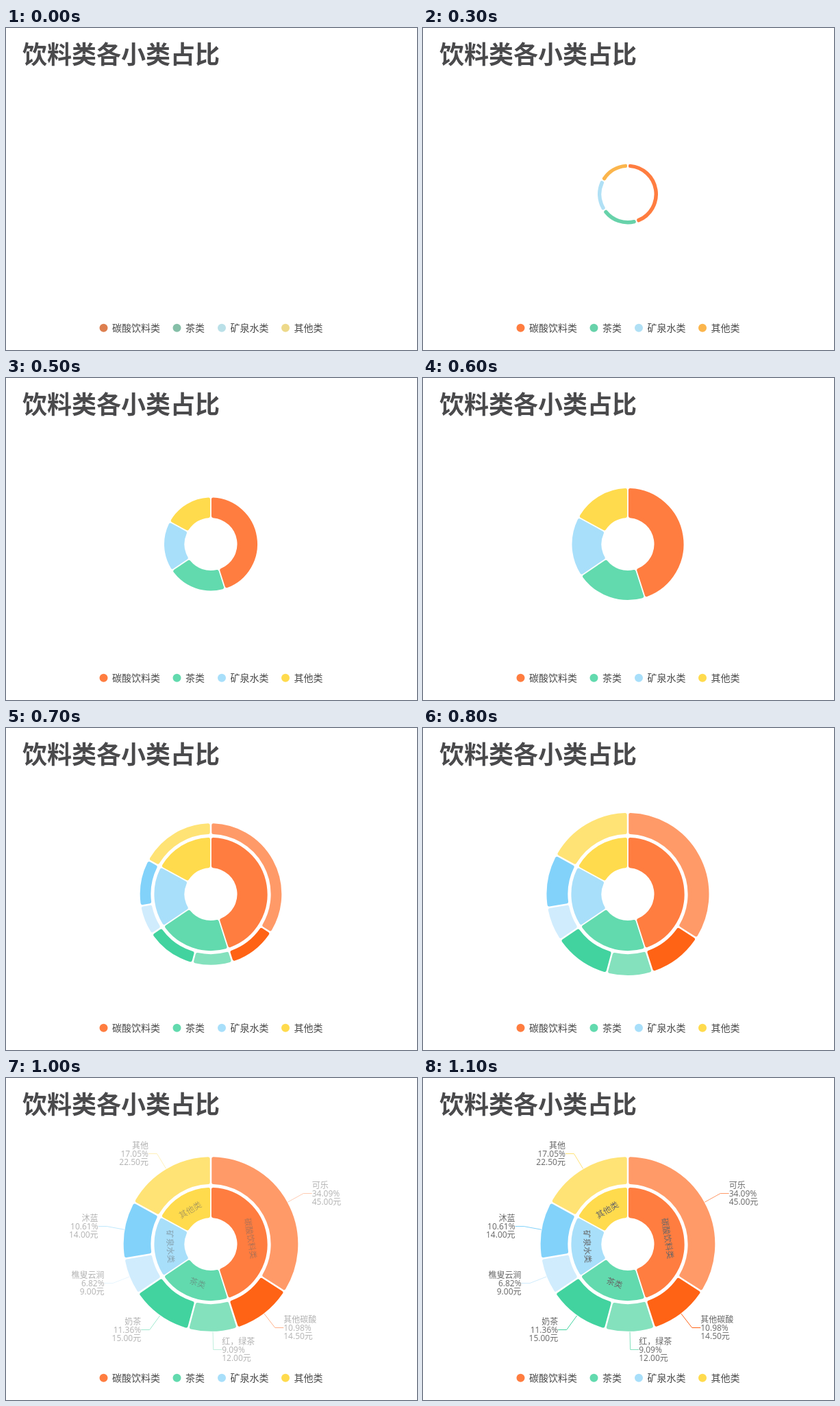
These frames come from a looping animation (600x470 px, 3 s). An HTML page:

```html
<!DOCTYPE html>
<html lang="zh-CN">
<head>
<meta charset="utf-8">
<title>饮料类各小类占比</title>
<style>
html, body { margin: 0; width: 100%; height: 100%; overflow: hidden; background: #fff; }
svg { display: block; width: 600px; height: 470px; }
text { font-family: "Open Sans", "Noto Sans CJK SC", "Noto Sans CJK", sans-serif; font-size: 12px; fill: #666; }
.title { font-size: 36px; font-weight: bold; fill: #4a4a4c; }
.legend { font-size: 14px; fill: #484848; }
.leader { fill: none; stroke-width: 1; }
path { stroke-linejoin: round; }
</style>
</head>
<body>
<svg id="stage" viewBox="0 0 600 470">
  <text class="title" x="24" y="52">饮料类各小类占比</text>
  <g id="legend"></g>
  <g id="rings"></g>
  <g id="labels"></g>
</svg>
<script>
const CX = 299, CY = 242.5, TOTAL = 132, LOOP = 3000, STEP = 100;
const groups = [
  { name: '碳酸饮料类', value: 59.5, color: '#ff7d40', legendX: 142.5 },
  { name: '茶类', value: 27, color: '#62daae', legendX: 249.5 },
  { name: '矿泉水类', value: 23, color: '#a8dffa', legendX: 315 },
  { name: '其他类', value: 22.5, color: '#ffdb4d', legendX: 408 }
];
const items = [
  { name: '可乐', value: 45, color: '#ff9a68' },
  { name: '其他碳酸', value: 14.5, color: '#ff6315' },
  { name: '红，绿茶', value: 12, color: '#84e1bd' },
  { name: '奶茶', value: 15, color: '#42d39f' },
  { name: '樵叟云涧', value: 9, color: '#d0ecfd' },
  { name: '沐蓝', value: 14, color: '#82d2fa' },
  { name: '其他', value: 22.5, color: '#ffe375' }
];
const mutedColors = ['#dd7f4f', '#85bfa8', '#bae0e8', '#edd98a'];
const earlyColors = ['#ff7d40', '#67d2aa', '#b0e0f5', '#fbb54c'];

// Outer radius of each ring, one value per step from its start; the last one holds.
const innerRing = { items: groups, inner: 38.5, gap: 1.8, start: 3, radii: [44, 55.5, 68, 81.5, 82.6] };
const outerRing = { items, inner: 87.6, gap: 2.5, start: 7, radii: [103.3, 118.5, 125.6, 127.3] };

function add(parent, tag, attrs, content = '') {
  const node = document.createElementNS('http://www.w3.org/2000/svg', tag);
  for (const key in attrs) node.setAttribute(key, attrs[key]);
  node.textContent = content;
  return document.getElementById(parent).appendChild(node);
}

// Angles run clockwise from twelve o'clock.
const point = (radius, angle) => [CX + radius * Math.sin(angle), CY - radius * Math.cos(angle)];

function sectorPath(inner, outer, from, to, inset, corner) {
  const ri = inner + corner, ro = outer - corner;
  const di = Math.asin(inset / ri), dout = Math.asin(inset / ro);
  return `M${point(ri, from + di)}L${point(ro, from + dout)}` +
    `A${ro} ${ro} 0 0 1 ${point(ro, to - dout)}L${point(ri, to - di)}` +
    `A${ri} ${ri} 0 0 0 ${point(ri, from + di)}Z`;
}

function setupRing(ring) {
  let angle = 0;
  for (const item of ring.items) {
    item.from = angle;
    item.to = angle += item.value / TOTAL * 2 * Math.PI;
    item.mid = (item.from + item.to) / 2;
    item.path = add('rings', 'path', { fill: item.color, stroke: item.color });
  }
}

function drawRing(ring, step, colors) {
  const index = Math.min(step - ring.start, ring.radii.length - 1);
  ring.items.forEach((item, i) => {
    const { path, from, to } = item;
    path.style.display = index < 0 ? 'none' : '';
    if (index < 0) return;
    const outer = ring.radii[index];
    const corner = Math.min(2.6, (outer - ring.inner) / 2 - 0.4);
    const color = colors ? colors[i] : item.color;
    path.setAttribute('d', sectorPath(ring.inner, outer, from, to, ring.gap / 2 + corner, corner));
    path.setAttribute('fill', color);
    path.setAttribute('stroke', color);
    path.setAttribute('stroke-width', corner * 2);
  });
}

function addLabels() {
  for (const { name, mid } of groups) {
    const [x, y] = point(59, mid);
    let turn = mid * 180 / Math.PI;
    if (turn > 270) turn -= 360;
    else if (turn > 90) turn -= 180;
    add('labels', 'text', { transform: `translate(${x} ${y + 0.7}) rotate(${turn})`, dy: 4.5, 'text-anchor': 'middle' }, name);
  }
  for (const { name, value, color, mid } of items) {
    const side = mid < Math.PI ? 1 : -1;
    const [x, elbowY] = point(154, mid);
    const y = Math.floor(elbowY) + 0.5; // keeps the horizontal part crisp
    const end = x + side * 12.5;
    add('labels', 'path', { class: 'leader', stroke: color, d: `M${point(128, mid)}L${x} ${y}H${end}` });
    const lines = [name, (value / TOTAL * 100).toFixed(2) + '%', value.toFixed(2) + '元'];
    lines.forEach((line, i) => add('labels', 'text', {
      x: end, y: y + (i - 1) * 12 + 4.8, 'text-anchor': side > 0 ? 'start' : 'end'
    }, line));
  }
}

setupRing(innerRing);
setupRing(outerRing);
addLabels();
for (const group of groups) {
  group.dot = add('legend', 'circle', { cx: group.legendX, cy: 437.8, r: 6 });
  add('legend', 'text', { class: 'legend', x: group.legendX + 12.5, y: 442.8 }, group.name);
}

const labels = document.getElementById('labels');
let shown = -1;

function render(step) {
  const colors = step < 3 ? mutedColors : step < 4 ? earlyColors : null;
  drawRing(innerRing, step, colors);
  drawRing(outerRing, step);
  groups.forEach((group, i) => group.dot.setAttribute('fill', colors ? colors[i] : group.color));
  labels.setAttribute('opacity', step < 10 ? 0 : step < 11 ? 0.5 : 1);
}

const begin = performance.now();
function tick() {
  const step = Math.floor((performance.now() - begin) % LOOP / STEP);
  if (step !== shown) render(shown = step);
  requestAnimationFrame(tick);
}
tick();
</script>
</body>
</html>
```
